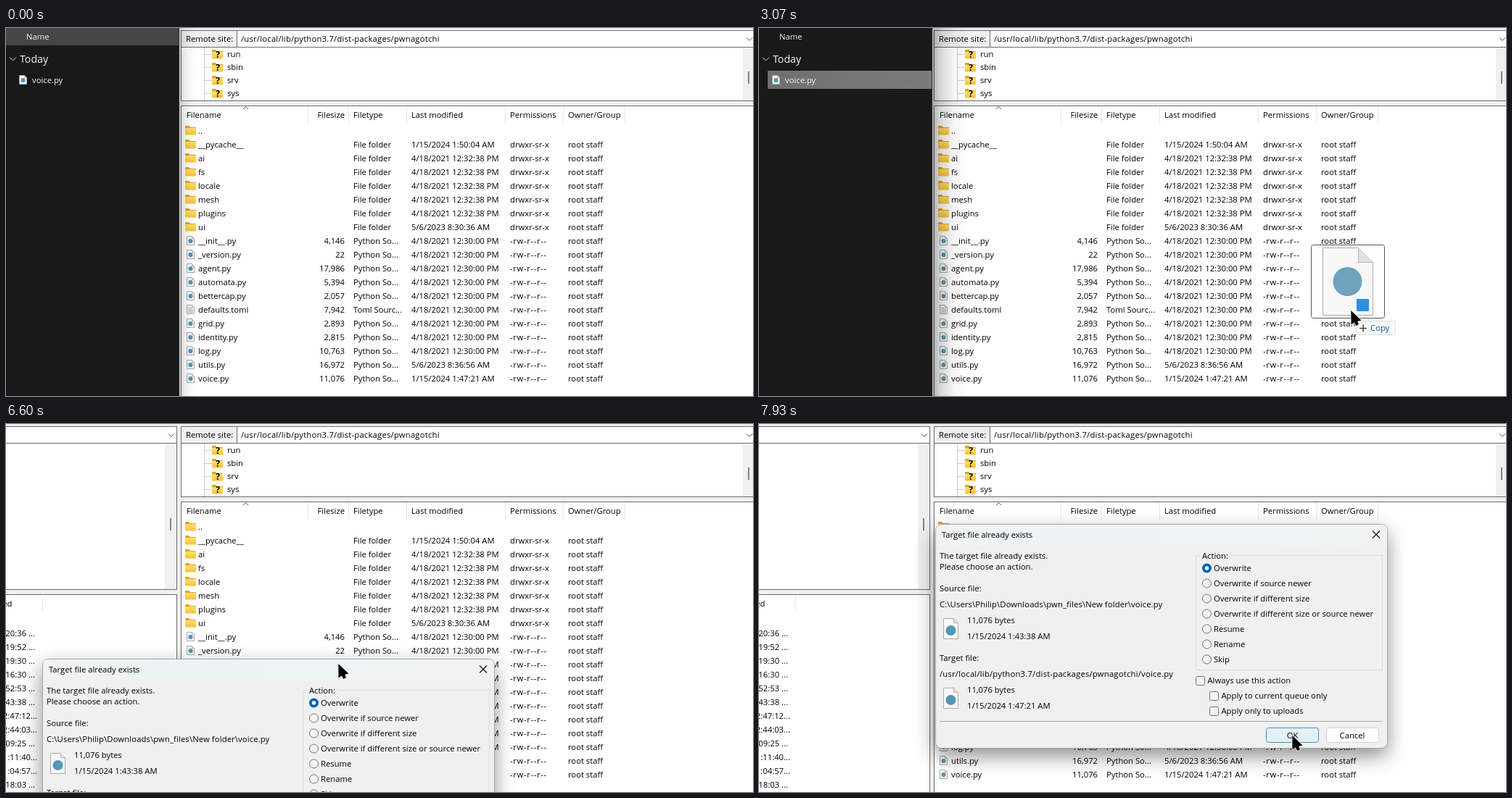
These frames come from a looping animation (1030x508 px, 8 s). An HTML page:

```html
<!DOCTYPE html>
<html lang="en">
<head>
<meta charset="utf-8">
<title>Upload a file</title>
<style>
html, body { margin: 0; width: 100%; height: 100%; overflow: hidden; background: #f0f0f0; }
svg { display: block; width: 100%; height: 100%; }
text { font: 11.25px "Open Sans", "Noto Sans", sans-serif; fill: #000; white-space: pre; }
.light { fill: #f4f4f4; }
.big { font-size: 14.2px; }
.end { text-anchor: end; }
.dashes { letter-spacing: .65px; }
.path { letter-spacing: .22px; }
.local { letter-spacing: .12px; }
.mark { font: bold 12px "Open Sans", sans-serif; text-anchor: middle; }
.mid { text-anchor: middle; }
</style>
</head>
<body>
<svg id="stage" viewBox="0 0 1030 508" preserveAspectRatio="none">
<defs>
  <linearGradient id="folder" x2="0" y2="1"><stop stop-color="#ffe07a"/><stop offset="1" stop-color="#fbc02f"/></linearGradient>
  <linearGradient id="edge">
    <stop stop-opacity=".3"/><stop offset=".25" stop-opacity=".15"/>
    <stop offset=".6" stop-opacity=".04"/><stop offset="1" stop-opacity="0"/>
  </linearGradient>
  <linearGradient id="caption">
    <stop stop-color="#f2f2f2"/><stop offset=".3" stop-color="#ecf3f4"/>
    <stop offset=".6" stop-color="#eef3f5"/><stop offset="1" stop-color="#f2f2f2"/>
  </linearGradient>
  <linearGradient id="sel"><stop stop-color="#6f6f6f"/><stop offset="1" stop-color="#7b7b7b"/></linearGradient>
  <filter id="blur" x="-15%" y="-30%" width="130%" height="160%"><feGaussianBlur stdDeviation="14"/></filter>
</defs>
<g id="client"></g>
<g id="dialog"></g>
<g id="explorer"></g>
<g id="ghost"></g>
<path id="cursor" d="M.3 0L.5 19.6L5 16.4L7.2 21L11 19.2L9.2 15L14.4 13.6Z"
  fill="#000" stroke="#fff" stroke-width="1.4" stroke-linejoin="round" paint-order="stroke"/>
</svg>
<script>
const $ = id => document.getElementById(id);
const rect = (x, y, w, h, fill, more = '') =>
  `<rect x="${x}" y="${y}" width="${w}" height="${h}" fill="${fill}" ${more}/>`;
const text = (x, y, s, cls = '') => `<text x="${x}" y="${y}" class="${cls}">${s}</text>`;
const line = (d, color, more = '') => `<path d="${d}" fill="none" stroke="${color}" ${more}/>`;
const disc = (x, y, r, fill, more = '') => `<circle cx="${x}" cy="${y}" r="${r}" fill="${fill}" ${more}/>`;
const DARK = '#6c6c6c', GREY = '#f0f0f0', PY = '#5595b5';

function folder(x, y) {
  return `<path d="M${x} ${y + 1}q0-1 1-1h4l2 2h7q1 0 1 1v4h-15z" fill="#e3a21a"/>` +
    rect(x, y + 3, 15, 9.5, 'url(#folder)', 'rx="1"');
}

function page(x, y, w, h, fold) {
  return `<path d="M${x + .5} ${y + .5}h${w - fold}l${fold} ${fold}v${h - fold}h${-w}z" fill="#f8f8f8" stroke="#a9a9a9"/>` +
    `<path d="M${x + w - fold + .5} ${y + .5}v${fold}h${fold}" fill="#e2e2e2" stroke="#b5b5b5"/>`;
}

const pyFile = (x, y) => page(x, y, 10, 12, 3) + disc(x + 5.5, y + 7, 3.1, PY);
const textFile = (x, y) => page(x, y, 10, 12, 3) +
  line(`M${x + 2} ${y + 4.5}h5m-5 2h7m-7 2h7m-7 2h7`, '#aaa');

// File transfer client
function buildClient() {
  const noon = '4/18/2021 12:30:00 PM', past = '4/18/2021 12:32:38 PM';
  const dirs = [['__pycache__', '1/15/2024 1:50:04 AM'], ['ai', past], ['fs', past], ['locale', past],
    ['mesh', past], ['plugins', past], ['ui', '5/6/2023 8:30:36 AM']];
  const files = [['__init__.py', '4,146'], ['_version.py', '22'], ['agent.py', '17,986'],
    ['automata.py', '5,394'], ['bettercap.py', '2,057'], ['defaults.toml', '7,942'], ['grid.py', '2,893'],
    ['identity.py', '2,815'], ['log.py', '10,763'], ['utils.py', '16,972', '5/6/2023 8:36:56 AM'],
    ['voice.py', '11,076', '1/15/2024 1:47:21 AM']];
  const left = ['20:36 ...', '19:52 ...', '19:30 ...', '16:30 ...', '52:53 ...', '43:38 ...', '2:47:12...',
    '2:44:03...', '09:25 ...', '1:11:40...', '1:04:57...', '18:03 ...'];

  let s = rect(0, 0, 1030, 508, GREY);
  // local side
  s += rect(0, 3, 236, 226, DARK) + rect(0, 4, 235, 22, '#fff') + rect(0, 27, 235, 201, '#fff') +
    rect(219, 27, 16, 201, GREY) + rect(226, 130, 2, 17, '#858585') +
    line('M224 13.5l4 4 4-4', '#444') +
    rect(0, 235, 236, 273, DARK) + rect(0, 236, 235, 272, '#fff') + rect(50, 237, 1, 24, '#e5e5e5') +
    text(8.5, 252, 'Last modified', 'end');
  left.forEach((v, i) => s += text(v.includes(' ') ? 40 : 43, 293 + 19 * i, v, 'end'));

  // remote side
  s += rect(241, 3, 789, 98, DARK) + rect(242, 4, 76, 22, GREY) + rect(319, 4, 711, 22, '#fff') +
    rect(242, 27, 788, 73, '#fff') + rect(1016, 27, 14, 73, GREY) + rect(1023, 60, 2, 17, '#858585') +
    line('M1021 13.5l4 4 4-4', '#444') +
    text(248, 19, 'Remote site:') + text(324, 19, '/usr/local/lib/python3.7/dist-packages/pwnagotchi', 'path') +
    line('M273.5 27V100', '#999', 'stroke-dasharray="1 1"');
  ['run', 'sbin', 'srv', 'sys'].forEach((v, i) => {
    const y = 36 + 18 * i;
    s += line(`M274 ${y + .5}h10`, '#999', 'stroke-dasharray="1 1"') + folder(284, y - 6) +
      text(292, y + 5, '?', 'mark') + text(305, y + 4, v);
  });
  s += rect(241, 107, 789, 401, DARK) + rect(242, 108, 788, 400, '#fff');
  for (const x of [416, 472, 552, 688, 768, 853]) s += rect(x, 108, 1, 24, '#e5e5e5');
  s += line('M327 112l3.5-3.5 3.5 3.5', '#555') + text(249, 124, 'Filename') + text(467, 124, 'Filesize', 'end') +
    text(479, 124, 'Filetype') + text(559, 124, 'Last modified') + text(695, 124, 'Permissions') +
    text(775, 124, 'Owner/Group') + folder(247, 135) + text(265, 146, '..');
  const row = (y, name, type, date, perm, cls) => text(265, y, name) + text(479, y, type) +
    text(559, y, date) + text(695, y, perm, cls) + text(775, y, 'root staff');
  dirs.forEach(([name, date], i) => {
    const y = 165 + 19 * i;
    s += folder(247, y - 11) + row(y, name, 'File folder', date, 'drwxr-sr-x', '');
  });
  files.forEach(([name, size, date = noon], i) => {
    const y = 298 + 19 * i, toml = name.endsWith('toml');
    s += (toml ? textFile : pyFile)(249, y - 11) + text(467, y, size, 'end') +
      row(y, name, toml ? 'Toml Sourc...' : 'Python So...', date, '-rw-r--r--', 'dashes');
  });
  $('client').innerHTML = s;
}

// Overwrite dialog, 623 by 309, at its own zero
function buildDialog() {
  const bigFile = y => page(11, y, 20, 28, 6) + disc(21.5, y + 17, 7, PY);
  const box = (x, y, label) => rect(x + .5, y - 5.5, 12, 12, '#f6f6f6', 'stroke="#6f6f6f" rx="2"') +
    text(x + 16.5, y + 4, label);
  const options = ['Overwrite', 'Overwrite if source newer', 'Overwrite if different size',
    'Overwrite if different size or source newer', 'Resume', 'Rename', 'Skip'];
  let s = rect(0, 11, 623, 309, '#000', 'rx="8" filter="url(#blur)" id="shade"') +
    rect(.5, .5, 623, 309, GREY, 'rx="8" stroke="#a6a6a6"') +
    '<path id="bar" d="M1 30V8.5q0-7.5 7.5-7.5h607q7.5 0 7.5 7.5V30z"/>' +
    text(9, 19, 'Target file already exists') +
    '<path id="close" d="M603 9.5l10 10m0-10l-10 10" stroke-width="1.1"/>' +
    text(6, 48, 'The target file already exists.') + text(6, 63, 'Please choose an action.') +
    text(6, 93, 'Source file:') +
    text(6, 115, 'C:\\Users\\Philip\\Downloads\\pwn_files\\New folder\\voice.py', 'local') +
    bigFile(130) + text(44, 137, '11,076 bytes') + text(44, 159, '1/15/2024 1:43:38 AM') +
    text(6, 189, 'Target file:') +
    text(6, 211, '/usr/local/lib/python3.7/dist-packages/pwnagotchi/voice.py', 'path') +
    bigFile(226) + text(44, 233, '11,076 bytes') + text(44, 255, '1/15/2024 1:47:21 AM') +
    rect(359.5, 43.5, 257, 158, 'none', 'stroke="#dcdcdc"') + rect(365, 40, 43, 8, GREY) + text(368, 48, 'Action:');
  options.forEach((v, i) => {
    const y = 61 + 21 * i;
    s += (i ? disc(374.5, y, 6, '#f3f3f3', `stroke="#727272" id="radio${i}"`)
      : disc(374.5, y, 6.5, '#005fb8') + disc(374.5, y, 2.8, '#fff', 'id="radio0"')) + text(384, y + 4, v);
  });
  s += box(359, 216, 'Always use this action') + box(378, 237, 'Apply to current queue only') +
    box(378, 258, 'Apply only to uploads') + rect(6, 272, 610, 1, '#a6a6a6') +
    rect(456.5, 281.5, 72, 20, '#fdfdfd', 'rx="3" id="ok"') + text(492.5, 296, 'OK', 'mid') +
    rect(539.5, 281.5, 72, 20, '#fdfdfd', 'rx="3" stroke="#d2d2d2"') + text(575, 296, 'Cancel', 'mid');
  $('dialog').innerHTML = s;
}

function buildExplorer() {
  $('explorer').innerHTML = rect(239, 0, 50, 508, 'url(#edge)', 'id="cast"') + rect(0, 0, 239, 508, '#191919') +
    rect(0, 0, 239, 24, '#464646', 'id="head"') + rect(12, 59, 227, 25, '#4d4d4d', 'id="row"') +
    rect(238, 0, 1, 508, '#2c2c2c') + text(28, 16, 'Name', 'light') +
    line('M5 40.5l4.5 4.5 4.5-4.5', '#ddd') + text(19, 48, 'Today', 'light big') +
    pyFile(18, 65) + text(36, 76, 'voice.py', 'light');
}

// Drag picture, placed from the cursor tip
function buildGhost() {
  $('ghost').innerHTML = rect(-54.5, -90.5, 101, 101, '#fdfdfd', 'rx="3" stroke="#555"') +
    page(-39, -87, 69, 93, 20) + disc(-4.5, -40, 20, '#6ea3bd') + rect(8, -16, 17, 17, '#2d8fd9', 'rx="1"') +
    '<g id="copy">' + rect(7.5, 14.5, 54, 19, '#f9f9f9', 'rx="3" stroke="#dedede"') +
    line('M12 24.5h10m-5-5v10', '#222', 'stroke-width="1.2"') +
    '<text x="27" y="28" style="fill:#0b55b0">Copy</text></g>';
}

// Tracks: [tick, x, y], straight between points
function at(track, k) {
  const i = track.findIndex(p => p[0] > k);
  if (i === 0) return track[0].slice(1);
  if (i < 0) return track[track.length - 1].slice(1);
  const a = track[i - 1], b = track[i], f = (k - a[0]) / (b[0] - a[0]);
  return [a[1] + (b[1] - a[1]) * f, a[2] + (b[2] - a[2]) * f];
}

const pointer = [
  [4, 66, 8], [6, 63, 36], [9, 60, 70], [24, 60, 70], [28, 80, 155], [30, 80, 155], [34, 55, 73], [39, 55, 73],
  [40, 61, 77], [41, 105, 100], [43, 370, 230], [45, 710, 362], [46, 816, 390], [48, 920, 404], [50, 951, 407],
  [57, 951, 407], [58, 948, 407], [68, 948, 407], [71, 891, 457],
  [90, 596, 413], [92, 520, 392], [95, 393, 337]];
const leave = [[110, 651, 145], [112, 662, 180], [116, 712, 350], [118, 732, 420], [119, 735, 430]];
const windowPath = [[97, -15, 330], [99, 50, 324], [101, 150, 306], [103, 222, 283], [104, 240, 269],
  [106, 246, 211], [108, 244, 151], [109, 243, 138]];

const show = (id, on) => { $(id).style.display = on ? '' : 'none'; };
const set = (id, attrs) => { for (const a in attrs) $(id).setAttribute(a, attrs[a]); };
const clamp = v => Math.max(0, Math.min(1, v));

function draw(ms) {
  const k = Math.floor((ms + 3.4) / (8000 / 120));
  const front = k >= 97;
  const [dx, dy] = at(windowPath, k);
  let [x, y] = at(pointer, k);
  if (k >= 110) [x, y] = at(leave, k);
  else if (front) { x = dx + 408; y = dy + 7; }

  // explorer
  show('explorer', !front);
  show('head', k < 6);
  show('row', k >= 8);
  set('row', { fill: k < 22 ? '#4d4d4d' : 'url(#sel)' });
  const focus = clamp((k - 21) / 3);
  set('cast', { width: 26 + 24 * focus, opacity: .55 + .45 * focus });

  // dialog
  const open = 1 - (1 - clamp((k - 81) / 5)) ** 2, size = .93 + .07 * open;
  show('dialog', k >= 82);
  set('dialog', {
    opacity: open,
    transform: `translate(${dx + 311.5 * (1 - size)} ${dy + 154.5 * (1 - size)}) scale(${size})`
  });
  set('shade', { opacity: front ? .45 : .16 });
  set('bar', { fill: front ? 'url(#caption)' : '#f3f3f3' });
  set('close', { stroke: front ? '#111' : '#8f8f8f' });
  const roams = k >= 90 && k < 97 || k >= 110;
  const lx = x - dx, ly = y - dy;
  const hot = roams && lx > 366 && lx < 612 ? Math.round((ly - 61) / 21) : -1;
  for (let i = 1; i < 7; i++) set('radio' + i, { fill: i === hot ? '#e6e6e6' : '#f3f3f3' });
  set('radio0', { r: hot === 0 ? 3.5 : 2.8 });
  const over = roams && ly > 281 && lx > 456 && lx < 529;
  set('ok', { fill: over ? '#e2f1f8' : '#fdfdfd', stroke: over ? '#3f93b8' : '#0078d4' });

  // pointer and dragged file
  const place = `translate(${x} ${y})`;
  set('cursor', { transform: place });
  show('cursor', k >= 4 && k < 72 || k >= 90);
  set('ghost', { transform: place });
  show('ghost', k >= 40 && k < 58);
  show('copy', x > 240);
}

buildClient();
buildDialog();
buildExplorer();
buildGhost();
const start = performance.now();
function loop() {
  draw((performance.now() - start) % 8000);
  requestAnimationFrame(loop);
}
draw(0);
requestAnimationFrame(loop);
</script>
</body>
</html>
```
